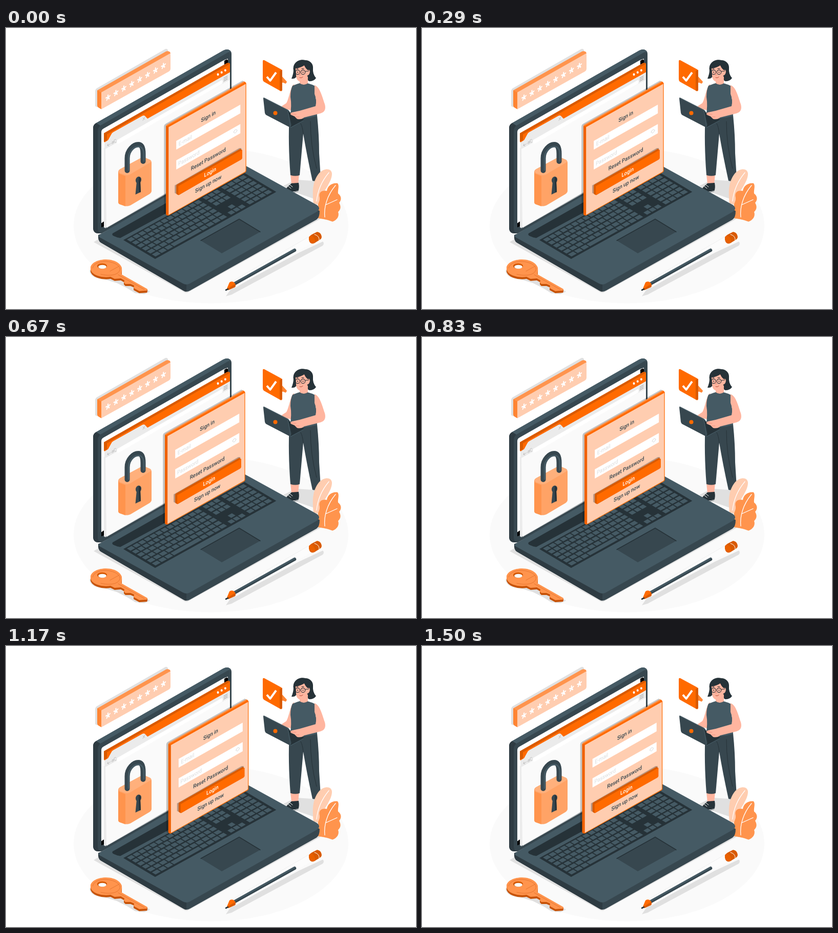
Write an HTML page with a canvas that moves like this. It is 800 px wide and 550 px high and loops after 1.54 s.

```html
<!DOCTYPE html>
<html lang="en">
<head>
<meta charset="utf-8">
<title>Sign in</title>
<style>
html, body { margin: 0; width: 800px; height: 550px; overflow: hidden; background: #fff; }
canvas { display: block; }
</style>
</head>
<body>
<canvas id="stage" width="800" height="550"></canvas>
<script>
const view = document.getElementById('stage').getContext('2d');
const backdrop = document.createElement('canvas');
backdrop.width = 800;
backdrop.height = 550;
let ctx = backdrop.getContext('2d');

const ORANGE = '#ff6a00', DEEP = '#d95a00', MID = '#ff944d', SOFT = '#ffa366', PEACH = '#ffcdb0';
const SLATE = '#455a64', DARK = '#37474f', SHADE = '#2e3b42', INK = '#263238', SKIN = '#ffb59f', GREY = '#e0e0e0';

function fill(d, color) {
  ctx.fillStyle = color;
  ctx.fill(new Path2D(d), 'evenodd');
}

function line(d, color, width = 1, cap = 'round') {
  ctx.strokeStyle = color;
  ctx.lineWidth = width;
  ctx.lineCap = cap;
  ctx.lineJoin = 'round';
  ctx.stroke(new Path2D(d));
}

function oval(x, y, rx, ry, color, turn = 0) {
  ctx.fillStyle = color;
  ctx.beginPath();
  ctx.ellipse(x, y, rx, ry, turn, 0, Math.PI * 2);
  ctx.fill();
}

function isoText(text, x, y, color, weight = 500) {
  ctx.save();
  ctx.transform(.87, -.49, 0, 1, x, y);
  ctx.font = `${weight} 10.8px Roboto, sans-serif`;
  ctx.textAlign = 'center';
  ctx.textBaseline = 'middle';
  ctx.fillStyle = color;
  ctx.fillText(text, 0, 0);
  ctx.restore();
}

function drawFloor() {
  oval(400, 387, 268, 152, '#fafafa');
  fill('M171 419 L186 410 L352 505 L612 360 L620 370 L354 518 Q350 519 346 516Z', GREY);
  fill('M541 309 L566 297 L612 300 L606 322 L600 334 L560 320Z', GREY);
}

function drawScreen() {
  fill('M170 196 Q170 189 176 186 L424 44 Q432 40 437 44 Q440 46 440 51 V262 L187 402 H181 Q171 402 170 393Z', DARK);
  fill('M170 196 Q170 189 176 186 L184 191 Q179 195 179 202 V394 Q180 400 184 402 H181 Q171 402 170 393Z', SHADE);
  fill('M176 186 L424 44 Q432 40 437 44 L439 47 Q436 46 431 49 L184 191Z', SLATE);
  fill('M186 204 Q186 199 190 197 L425 63 L433 60 V256 L186 389Z', '#fff');
  fill('M426 64 Q433 59 433 64 V70 L426 73Z M186 382 L192 378 V388 L186 390Z', '#000');

  fill('M191 235 L197 231 V388 L194 392 L191 390Z', '#ebebeb');
  fill('M194 235 L437 98 V251 L196 391Z', '#fafafa');
  line('M196 391 L320 320', '#dedede', 1);
  fill('M192 221 L437 84 V101 L192 238Z', '#ebebeb');
  fill('M191 206 L432 69 Q436 67 437 70 V86.5 L276 177.5 L268 172 L207 206 L200 219 L192 224Z', ORANGE);
  fill('M191 206 L432 68 L437 70 L197 208 V220 L191 223Z', DEEP);
  fill('M199 220 L205 209 Q206 206 209 204 L266 172 Q270 170 272 173 L276 177.5Z', '#ebebeb');
  fill('M217 219 L421 102 Q424 102 422 109 L219 227 Q215 225 217 219Z', '#fff');
  line('M198 230 L203 227 M199 227 L198 230 L201 231 M205 226 L210 223 M207 222 L210 223 L208 227 M215 219 A2.5 3 0 1 0 215 223 M267 176 L271 179 M271 174 L267 181', '#b5b5b5', .8);
  line('M425 98 L432 94 M425 101 L432 97 M425 104 L432 100', '#9e9e9e', 1);
  for (let i = 0; i < 3; i++) oval(413.5 + i * 7.2, 91 - i * 4.1, 2, 2.4, '#fff');
}

function drawPadlock() {
  fill('M219 282 Q219 278 223 276 L264 254 Q269 252 274 255 L281 258 Q284 260 284 264 V319 Q284 322 280 325 L243 347 Q237 350 231 348 L222 345 Q219 344 219 340Z', SOFT);
  fill('M219 281 Q219 285 223 286 L233 290 V349 L222 345 Q219 344 219 340Z', MID);
  fill('M220 281 Q220 278 224 276 L264 254 Q269 252 274 255 L281 258 Q286 261 280 264 L243 286 Q237 290 231 287 L222 284Z', '#ffb07c');
  line('M236.5 279 V255 C236.5 239 249 228 258 228 C266 228 267.5 236 267.5 246 V261', DARK, 10);
  line('M239 278 V255 C239 242 250 232 258 232 C265 232 269 238 269 248 V260', SLATE, 3);
  oval(258.5, 297.5, 5.5, 6.8, DARK, .3);
  fill('M255 300 L262 297 L263 321 L252.5 326Z', DARK);
  fill('M259 292 Q265 293 262 301 L263 321 L260 322 L259 303Z', INK);
}

function drawPasswordTag() {
  fill('M174 123 Q174 120 177 118 L311 41 Q315 40 316 44 V80 L178 155 L174 153Z', GREY);
  fill('M178 122 L312 46 Q316 44 320 47 L321 50 L187 126 V158 L181 156 Q178 154 178 151Z', MID);
  fill('M178 122 L186 126 V159 L181 156 Q178 154 178 151Z', '#ff8533');
  fill('M186 126 L318 51 Q321 49 321 53 V80 Q321 83 318 85 L186 159Z', PEACH);
  for (let i = 0; i < 8; i++) {
    ctx.save();
    ctx.transform(.87, -.49, 0, 1, 199 + i * 15.45, 136 - i * 8.85);
    for (let k = 0; k < 5; k++) {
      ctx.rotate(Math.PI * .4);
      line('M0 0 V-4.6', '#fff', 2.5);
    }
    ctx.restore();
  }
}

// Keyboard coordinates: s runs along the rows, t from back to front.
function keyboardQuad(s0, s1, t0, t1, color) {
  const at = (s, t) => `${229 + 234 * s + 62 * t} ${415 - 130 * s + 37 * t}`;
  fill(`M${at(s0, t0)} L${at(s1, t0)} L${at(s1, t1)} L${at(s0, t1)}Z`, color);
}

function keyRow(row, from, to, count) {
  const step = (to - from) / count;
  for (let i = 0; i < count; i++) {
    const s = from + i * step;
    keyboardQuad(s + .004, s + step - .004, .04 + row * .157, .155 + row * .157, SLATE);
  }
}

function drawBase() {
  fill('M180 405 Q179 416 185 420 L346 514 Q352 518 359 514 L606 375 Q612 371 612 358 L470 290Z', DARK);
  fill('M180 405 Q179 416 185 420 L346 514 Q349 516 352 516 V500Z', SHADE);
  fill('M187 402 L440 255 L472 272 L606 346 Q616 353 606 360 L359 500 Q352 504 345 500 L185 411 Q176 407 187 402Z', SLATE);
  fill('M208 402 L440 270 L462 282 L223 411 Q216 410 210 407 Q206 405 208 402Z', INK);

  keyboardQuad(0, 1.01, 0, 1, INK);
  keyRow(0, .015, .62, 13);
  keyRow(1, .015, .62, 14);
  keyRow(2, .015, .62, 13);
  keyRow(3, .015, .62, 13);
  keyRow(4, .015, .62, 12);
  keyRow(5, .015, .17, 3);
  keyRow(5, .17, .41, 1);
  keyRow(5, .41, .62, 4);
  for (let row = 0; row < 3; row++) keyRow(row, .645, .775, 3);
  keyRow(4, .688, .732, 1);
  keyRow(5, .645, .775, 3);
  for (let row = 0; row < 6; row++) keyRow(row, .8, .995, 4);

  fill('M380 416 L455 374 L496 399 L421 441Z', DARK);
  line('M380 416 L455 374 L496 399', INK, 1.5);
}

function drawKey() {
  fill('M163 474 Q163 490 196 493 L216 499 L236 509 L252 519 L270 521 L281 516 L228 484Z', GREY);
  const outline = 'M165 470 C165 459 181 453 195 453 C215 453 228 464 226 474 L225 482 L276 511 L275 514 L260 515 L249 509 L250 504 L243 501 L233 501 L230 498 L231 494 L224 490 L212 491 L204 487 C184 490 164 482 165 470Z';
  for (let dy = 4; dy > 0; dy--) {
    ctx.save();
    ctx.translate(0, dy);
    fill(outline, '#c75308');
    ctx.restore();
  }
  fill(outline + ' M178 466 A9.5 5.2 0 1 0 197 466 A9.5 5.2 0 1 0 178 466Z', MID);
  fill('M178 466 A9.5 5.2 0 0 1 197 466 Q188 460 178 466Z', DEEP);
  oval(188, 467.5, 7.8, 3.8, '#fafafa');
  line('M169 470 C171 459 187 456 197 457 C215 459 224 467 222 474 C218 486 196 485 185 482 M219 483 L270 512 M203 476 L221 466', '#e87630', 1);
}

function drawPencil() {
  fill('M429 525 L438 512 L571 440 L618 418 Q622 421 618 426 L440 522Z', GREY);
  fill('M437 499 L590 409 L600 419 L448 508Z', '#fcfcfc');
  line('M443 495 L590 409', '#f0f0f0', 1);
  line('M447 500 L563 435', DARK, 6.5);
  line('M447 498.5 L563 433.5', SLATE, 3);
  fill('M431 510 L436 498 Q439 495 444 497 Q450 502 447 507 L434 513Z', ORANGE);
  fill('M434 513 L447 507 Q449 503 447 501 L433 510Z', DEEP);
  line('M429 513 L433 511', INK, 2.6);
  fill('M591 410 Q593 406 599 403 L607 399 Q615 400 616 409 Q616 412 613 414 L602 421 Q593 425 591 414Z', DEEP);
  oval(597, 414, 5.4, 8, '#e86000', -.5);
  line('M602 404 Q612 407 611 415', '#fff', 1);
}

function drawCheckBubble() {
  fill('M536 94 L548 107 L537 107Z', MID);
  fill('M538 94 L548 105 L546 109 L538 106Z', '#ff8533');
  fill('M501 65 Q501 62 504 63 L537 81 Q539 82 539 85 V121 Q538 125 535 123 L503 105 Q501 103 501 100Z', ORANGE);
  fill('M534 84 L539 82 V121 Q538 125 534 122Z', DEEP);
  line('M509 95.5 L515.5 103 L527 87', '#fff', 4, 'butt');
}

function drawWoman() {
  fill('M555 286 H572 L570 306 H557Z', SKIN);
  fill('M545 316 Q551 309 557 304 L571 303 Q573 313 570 320 Q559 324 546 320Z', INK);
  line('M546 319 Q558 323 570 319 M551 310 L556 314 M554 307 L559 311', '#fff', 1);

  fill('M553 172 L607 171 Q611 210 611 245 L614 294 Q607 302 598 299 Q587 249 580 207 L573 288 Q565 291 555 288 Q550 224 553 172Z', DARK);
  line('M580 207 Q579 194 575 187 M594 183 Q594 230 606 275', INK, 1);

  fill('M562 110 C555 114 553 137 547 147 L538 153 L541 158 L557 161 L566 126Z', SKIN);
  fill('M559 113 Q569 109 573 108 H588 Q596 110 604 114 Q602 129 606 144 L607 172 Q580 180 554 173 Q558 152 555 135 Q555 121 559 113Z', SLATE);

  fill('M561 82 C559 67 573 60 584 63 C593 63 600 70 599 79 Q598 90 605 98 Q600 105 591 104 L582 96 L566 96 Q563 100 557 99 Q561 90 561 82Z', INK);
  fill('M573 95 H589 V108 Q581 114 573 108Z', SKIN);
  fill('M565 79 Q572 79 582 73 L588 82 Q593 80 593 86 Q592 92 588 93 Q588 104 577 105 Q566 105 566 92Z', SKIN);
  fill('M561 84 Q559 68 573 65 Q588 63 591 83 Q585 81 582 73 Q574 78 565 78Z', INK);
  ctx.strokeStyle = INK;
  ctx.lineWidth = 1.1;
  for (const x of [569, 579.5]) {
    ctx.beginPath();
    ctx.ellipse(x, 86.5, 4.2, 4.4, 0, 0, Math.PI * 2);
    ctx.stroke();
    oval(x, 86.5, .8, 1.2, INK);
  }
  line('M584 85 L591 84 M567 80 L570 79.5 M577 79.5 L581 79.5', INK, 1);
  line('M574 87 L572 92 L575 92', '#e98876', .9);
  line('M573 97 Q576 99 579 96', '#b84b38', 1);

  fill('M502 138 Q502 135 505 137 L550 160 Q553 162 554 165 L557 193 Q556 196 553 194 L509 171 Q506 170 505 166Z', DARK);
  line('M503 137 L550 161 L555 194', SLATE, 1.2);
  fill('M554 195 L582 181 L578 176 L551 164 L557 190Z', INK);
  line('M555 195 L581 181', SLATE, 1.3);
  oval(525.5, 166.5, 4, 4, ORANGE);
  fill('M602 112 C612 115 616 131 622 149 Q626 163 614 167 L582 175 Q576 180 568 178 L563 173 L556 170 Q553 166 559 165 L573 162 L604 153 Q607 141 602 129Z', SKIN);
  line('M556 168 L566 169 M566 174 L572 174', '#e98876', .8);
}

function drawLeaves() {
  fill('M600 343 C598 322 597 301 611 284 C621 274 635 274 636 285 C636 301 622 315 616 330 L609 346Z', PEACH);
  line('M606 339 C608 318 615 301 630 283', '#fff', 1.2);
  fill('M608 372 C606 362 611 356 609 349 C608 342 613 340 612 332 C609 321 617 317 626 319 C627 309 637 302 647 304 C651 309 647 317 648 324 C656 330 654 338 650 342 C655 351 652 356 648 360 C651 368 646 376 637 379 C627 375 619 374 608 372Z', MID);
  line('M622 370 C620 352 626 328 643 308 M624 346 L646 336', '#fff', 1.3);
}

function drawPanel() {
  fill('M308 193 Q308 189 312 187 L461 103 L465 105 L314 194 V366 L308 364Z', 'rgba(0,0,0,.22)');
  fill('M312 192 Q312 190 314 189 L463 105 Q466 104 468.5 108 V280 Q468 282 466 283 L317 367 Q312 367 312 364Z', ORANGE);
  fill('M312 192 L317 194 V367 Q312 367 312 364Z', '#f06000');
  fill('M317 194 L467.3 109.5 V279 Q467.3 281 465 282 L317 365.7Z', PEACH);
  line('M313 191 L464 106', MID, 1.6);

  isoText('Sign in', 394.5, 173.5, DARK);
  fill('M332 221 L457 150 V167 L332 238Z', '#fff');
  fill('M332 259 L457 188 V206 L332 277Z', '#fff');
  isoText('E-mail', 349.5, 220.5, '#dcdcdc', 400);
  isoText('Password', 356.5, 255, '#dcdcdc', 400);
  line('M444 204 Q447 196 451 200 Q447 209 444 204', '#d8d8d8', 1);

  isoText('Reset Password', 394.5, 257, DARK);
  fill('M329 308 L455 235 L459 235 V240 L333 311 V325 L329 323Z', 'rgba(70,60,55,.38)');
  fill('M332 309 Q332 307 334 306 L457 236.5 L460.5 239 V255 L337 327 Q332 326 332 323Z', DEEP);
  fill('M336 309.5 L460.5 238.5 V255 Q460 257 458 258 L336 327Z', ORANGE);
  isoText('Login', 398, 282.5, '#fff');
  isoText('Sign up now', 394.5, 305.5, DARK);
}

drawFloor();
drawScreen();
drawPadlock();
drawPasswordTag();
drawWoman();
drawLeaves();
drawBase();
drawKey();
drawPencil();
drawCheckBubble();

const LOOP = 1540, FPS = 24, KEY_GAP = 150, LEAD = 30, UNIT = 2.2;
const SHAKE = [0, -1, 2, -4, 4, -4, 4, -4, 2, -1, 0];

function panelShift(ms) {
  const stepTime = Math.floor((ms + 5) * FPS / 1000) * 1000 / FPS;
  const place = Math.min((stepTime + LEAD) / KEY_GAP, SHAKE.length - 1);
  const i = Math.min(Math.floor(place), SHAKE.length - 2);
  return UNIT * (SHAKE[i] + (SHAKE[i + 1] - SHAKE[i]) * (place - i));
}

ctx = view;

function render() {
  const ms = performance.now() % LOOP;
  ctx.fillStyle = '#fff';
  ctx.fillRect(0, 0, 800, 550);
  ctx.drawImage(backdrop, 0, 0);
  ctx.save();
  ctx.translate(panelShift(ms) + .7, 0);
  drawPanel();
  ctx.restore();
  requestAnimationFrame(render);
}
render();
</script>
</body>
</html>
```
